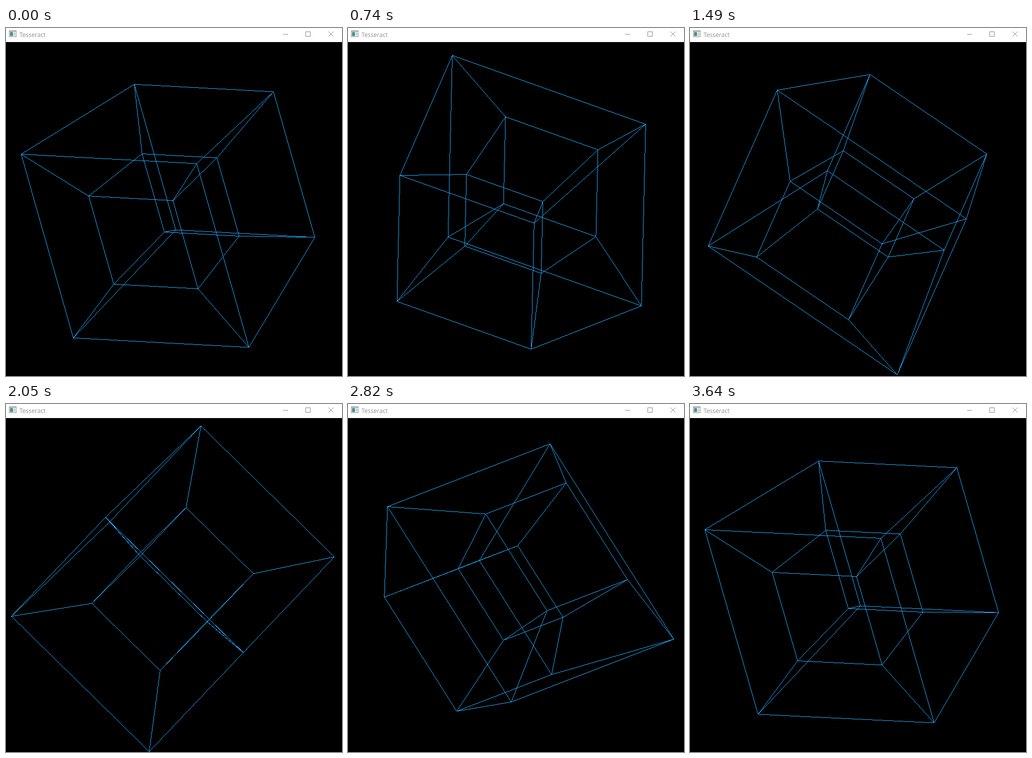
Animation of 672 by 693 pixels, one loop 3670 ms. Source, as an HTML page with a canvas:

```html
<!DOCTYPE html>
<html lang="en">
<head>
<meta charset="utf-8">
<title>Tesseract</title>
<style>
  html, body { margin: 0; width: 100%; height: 100%; overflow: hidden; background: #000; }
  svg, canvas { display: block; }
  text { font: 12px "Noto Sans", "Open Sans", sans-serif; fill: #999; }
</style>
</head>
<body>
<svg width="672" height="28">
  <rect width="672" height="28" fill="#fff"/>
  <g shape-rendering="crispEdges">
    <rect x="6" y="5" width="15" height="13" fill="#8d999f"/>
    <rect x="7" y="7" width="13" height="10" fill="#f2f5f6"/>
    <rect x="8" y="8" width="6" height="8" fill="#4f8f88"/>
    <rect x="15" y="8" width="4" height="8" fill="#cddadd"/>
    <path d="M554 12.5h10M599.5 7.5h9v9h-9z" fill="none" stroke="#888"/>
  </g>
  <path d="M645 7l10 10M655 7l-10 10" stroke="#888"/>
  <text x="27" y="18">Tesseract</text>
</svg>
<canvas width="672" height="665"></canvas>
<script>
const ctx = document.querySelector('canvas').getContext('2d');
const LOOP = 3670, SIZE = 379.3, CENTER_X = 336, CENTER_Y = 337.7, CAMERA_W = 3;

// Time in ms, angle in degrees, screen updates until the next key
const KEYS = [
  [0, -51.8, 23], [740, -34, 23], [1490, -15.2, 17], [2050, -0.93, 23],
  [2820, 17.44, 16], [3380, 31.9, 8], [3640, 37.92, 1], [LOOP, 38.2, 1]
];

function angleAt(time) {
  const next = KEYS.findIndex(key => key[0] > time);
  const [start, from, steps] = KEYS[next - 1];
  const [end, to] = KEYS[next];
  const step = Math.floor((time - start) / (end - start) * steps + 1e-6);
  return from + (to - from) * step / steps;
}

// Corner of a square with side 2, turned by an angle in degrees
function corner(degrees, index) {
  const a = (degrees + 45 + 90 * index) * Math.PI / 180;
  return [Math.SQRT2 * Math.cos(a), Math.SQRT2 * Math.sin(a)];
}

// The xy plane turns by -angle and the zw plane by twice the angle
function vertex(angle, i, j) {
  const [x, y] = corner(-angle, i), [z, w] = corner(2 * angle, j);
  const scale = SIZE / (CAMERA_W - w);
  const along = x * Math.SQRT1_2, across = (y + z) / 2;
  return [CENTER_X + scale * (along + across), CENTER_Y + scale * (along - across)];
}

// One-pixel line without antialiasing, sampled at pixel centres of its longer axis
function line(a, b) {
  const major = Math.abs(b[0] - a[0]) > Math.abs(b[1] - a[1]) ? 0 : 1, minor = 1 - major;
  if (a[major] > b[major]) [a, b] = [b, a];
  const slope = (b[minor] - a[minor]) / (b[major] - a[major]);
  for (let m = Math.floor(a[major]); m <= b[major]; m++) {
    const n = Math.floor(a[minor] + (m + 0.5 - a[major]) * slope);
    ctx.fillRect(major ? n : m, major ? m : n, 1, 1);
  }
}

function draw(now) {
  const angle = angleAt(now % LOOP);
  ctx.fillStyle = '#000';
  ctx.fillRect(0, 0, 672, 665);
  ctx.fillStyle = '#24aaff';
  for (let i = 0; i < 4; i++)
    for (let j = 0; j < 4; j++) {
      const here = vertex(angle, i, j);
      line(here, vertex(angle, i + 1, j));
      line(here, vertex(angle, i, j + 1));
    }
}

const origin = performance.now();
function tick(now) {
  draw(Math.max(0, now - origin));
  requestAnimationFrame(tick);
}
draw(0);
requestAnimationFrame(tick);
</script>
</body>
</html>
```
